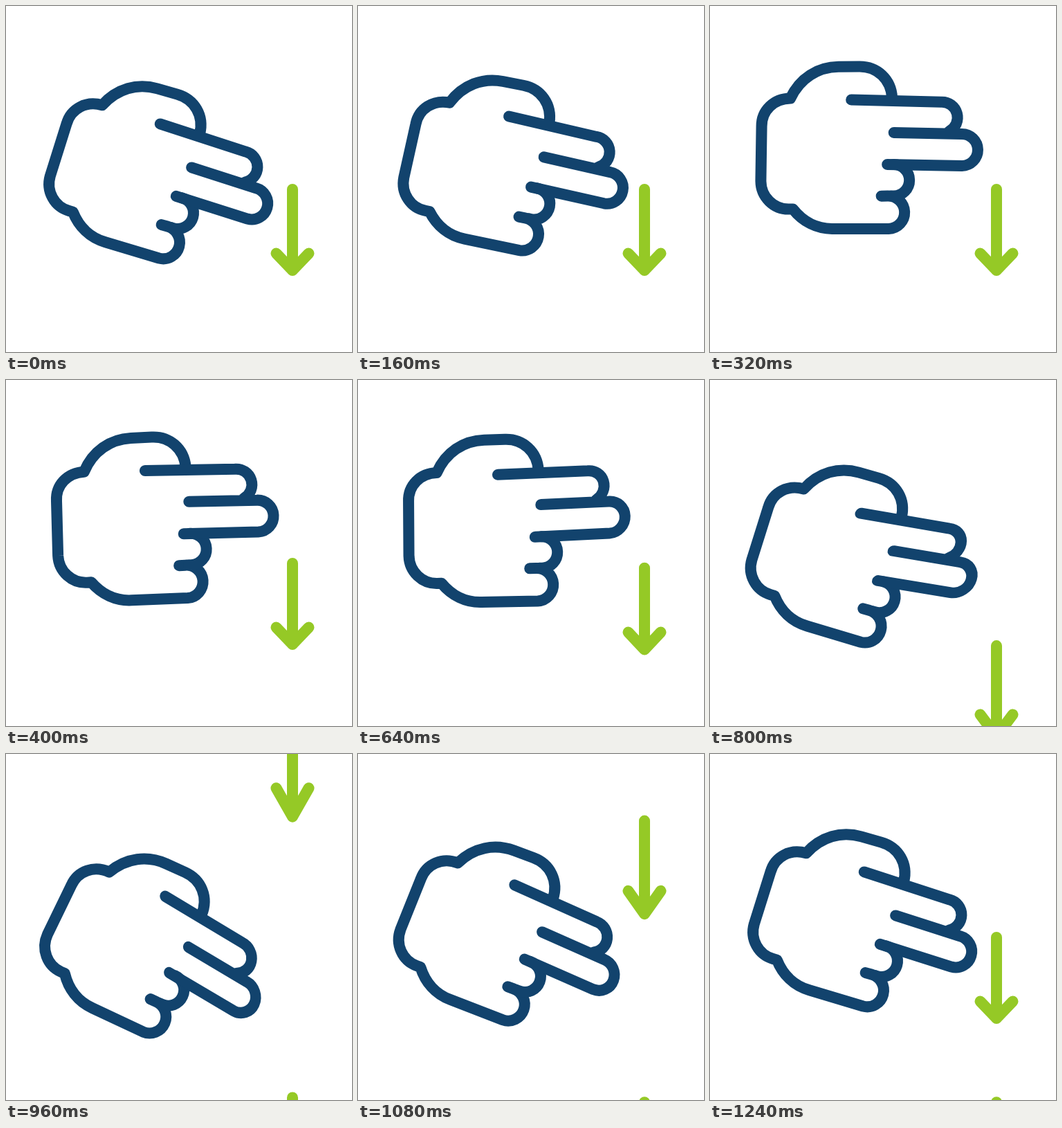
Write an HTML page that moves like this. It is 500 by 500 pixels and loops after 1480 ms.

```html
<!DOCTYPE html>
<html lang="en">
<head>
<meta charset="utf-8">
<title>Two-finger swipe down</title>
<style>
  html, body { margin: 0; height: 100%; overflow: hidden; background: #fff; }
  svg { display: block; width: 100vw; height: 100vh; }
  path { fill: none; stroke-width: 16; stroke-linecap: round; stroke-linejoin: round; }
  #hand path { stroke: #12436d; }
  .arrow { stroke: #95c926; }
</style>
</head>
<body>
<svg viewBox="0 0 500 500">
  <g id="hand">
    <path d="M265 134C264 107 244 88 218 88H188C158 88 132 104 118 133C94 133 76 150 76 173L74 252C74 275 92 293 114 293H120C134 311 154 322 177 322L258 323A23.7 23.7 0 0 0 257 275.5H248"/>
    <path d="M262 275.5H266A22.7 22.7 0 0 0 266 230"/>
    <path id="fingers" d="M206 136L336 140.5A22.5 22.5 0 0 1 347 183M267 184L365 187A23 23 0 0 1 365 233L257 230"/>
  </g>
  <path class="arrow" id="leaving"/>
  <path class="arrow" id="entering"/>
</svg>
<script>
const LOOP = 1480, STEP = 40;
const [hand, fingers, leaving, entering] =
  ['hand', 'fingers', 'leaving', 'entering'].map(id => document.getElementById(id));

const rest = { x: 118, y: 220, angle: 16 };
const raised = { x: 118, y: 212, angle: -3 };
const low = { x: 116, y: 244.5, angle: 24.8 };

const phase = (t, from, to) => Math.min(1, Math.max(0, (t - from) / (to - from)));
const easeInOut = u => u * u * (3 - 2 * u);
const easeOut = u => Math.sin(u * Math.PI / 2);
const mix = (a, b, u) => a + (b - a) * u;

// Raise the hand, swipe down, then settle
function handPose(t) {
  const [from, to, u] =
    t < 600 ? [rest, raised, phase(t, 40, 400)] :
    t < 920 ? [raised, low, phase(t, 600, 920)] :
    [low, rest, phase(t, 920, 1240)];
  const at = key => mix(from[key], to[key], easeInOut(u));
  return { x: at('x'), y: at('y'), angle: at('angle') };
}

// The fingers trail behind the swipe, whip past it and relax
function fingerBend(t) {
  if (t < 800) return -8.2 * easeOut(phase(t, 600, 800));
  if (t < 960) return mix(-8.2, 4.6, easeInOut(phase(t, 800, 960)));
  return 4.6 * (1 - easeOut(phase(t, 960, 1240)));
}

// The arrow is longer the further it is from rest
function arrowPath(offset) {
  const y = 357.5 + offset, stretch = 0.055 * Math.abs(offset);
  const tip = y + 24.5 + stretch;
  return `M414 ${y - 92.5 - stretch}V${tip}M390.5 ${y}L414 ${tip}L437.5 ${y}`;
}

function draw(t) {
  const { x, y, angle } = handPose(t), bend = fingerBend(t);
  hand.setAttribute('transform',
    `translate(${x + bend / 4} ${y}) rotate(${angle}) translate(-119 -212.5)`);
  const b = bend * Math.PI / 180;
  fingers.setAttribute('transform',
    `translate(262 0) matrix(${Math.cos(b)} ${Math.sin(b)} 0 1 0 0) translate(-262 0)`);
  leaving.setAttribute('d', arrowPath(252 * easeInOut(phase(t, 600, 1000))));
  entering.setAttribute('d', t < 840 ? '' : arrowPath(-480 * (1 - phase(t, 832, 1240)) ** 1.176));
}

function frame() {
  const t = performance.now() % LOOP;
  draw(Math.floor(t / STEP) * STEP);
  requestAnimationFrame(frame);
}
frame();
</script>
</body>
</html>
```
